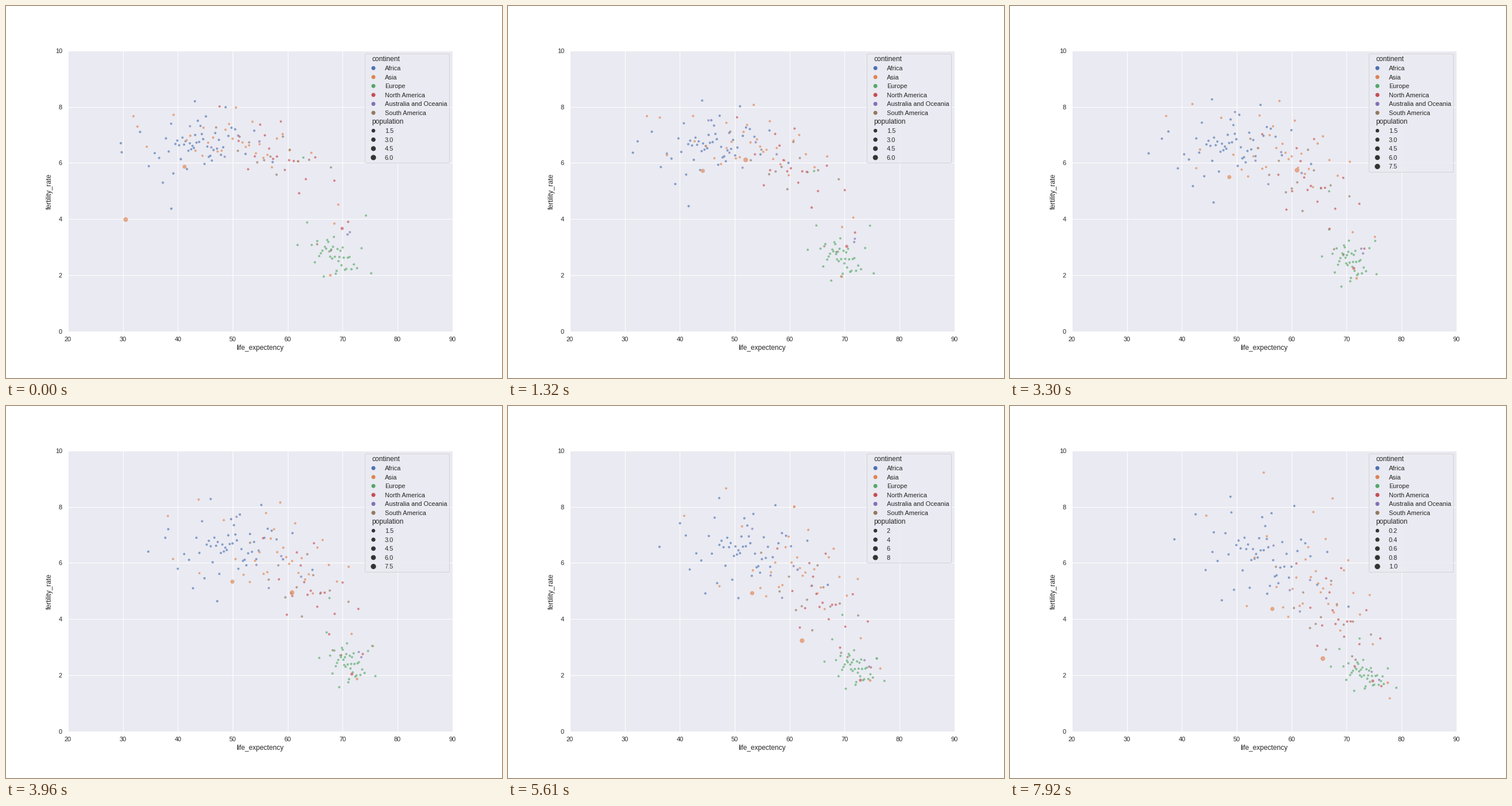
A matplotlib script that plays this animation: 864 px wide and 648 px high, repeating every 8000 ms.

```python
import numpy as np
import matplotlib.pyplot as plt
from matplotlib.animation import FuncAnimation
from matplotlib.patches import FancyBboxPatch, Rectangle

plt.rcParams.update({"font.family": "Liberation Sans", "text.color": "#262626"})

W, H, DPI = 864, 648, 72
LEFT, RIGHT, TOP, BOTTOM = 108, 777.6, 77.76, 567
YEARS, HOLD, TICK, LOOP = 25, 330, 20, 8000
PANEL = "#EAEAF2"
COLORS = {"Africa": "#4C72B0", "Asia": "#DD8452", "Europe": "#55A868",
          "North America": "#C44E52", "Australia and Oceania": "#8172B3",
          "South America": "#937860"}

year = np.arange(YEARS)
rng = np.random.default_rng(11)


def at_years(keys, values):
    return np.interp(year, keys, values)


def cloud(n, *stages):
    """Bell-shaped cloud of n dots; each stage (years 0, 10, 24) gives
    its centre x, y, its spread x, y and its slope."""
    u = (np.arange(n) + 0.5) / n
    bell = 0.55 * np.log(u / (1 - u))
    zx, zy = rng.permutation(bell), rng.permutation(bell)
    cx, cy, sx, sy, slope = (at_years((0, 10, 24), v)[:, None] for v in zip(*stages))
    dx = sx * zx
    return np.stack([cx + dx, cy + slope * dx + sy * zy], axis=2)


def line(x0, y0, x1, y1):
    return track((0, YEARS - 1), (x0, x1), (y0, y1))


def track(keys, xs, ys):
    return np.stack([at_years(keys, xs), at_years(keys, ys)], axis=1)[:, None]


groups = {
    "Africa": [
        cloud(50, (333, 242, 52, 26, 0), (383, 243, 56, 28, 0), (438, 258, 60, 40, 0.3)),
        line(329, 166, 384, 158), line(200, 239, 355, 220), line(288, 353, 448, 327),
    ],
    "Asia": [
        cloud(29, (412, 242, 75, 28, 0.25), (480, 262, 70, 42, 0.3), (537, 318, 56, 58, 0.5)),
        line(222, 192, 342, 191), line(229, 210, 442, 116), line(344, 212, 562, 161),
        line(572, 379, 632, 415),
        # a collapse that leaves the panel and comes back
        track((0, 10, 14, 15, 16, 18, 19, 20, 21, 24),
              (321, 331, 251, 124, 95, 95, 124, 186, 280, 426),
              (226, 250, 283, 288, 291, 292, 290, 289, 283, 264)),
    ],
    "Europe": [
        cloud(38, (572, 434, 27, 18, 0.3), (591, 444, 20, 20, 0.2), (616, 467, 24, 14, 0.25)),
        line(518, 264, 609, 405), line(627, 365, 649, 471),
    ],
    "North America": [
        cloud(17, (472, 258, 52, 32, 0.7), (524, 308, 44, 42, 0.8), (572, 366, 38, 46, 1)),
        line(596, 376, 647, 488),
    ],
    "Australia and Oceania": [
        cloud(5, (381, 236, 50, 22, 0), (450, 262, 48, 40, 0.5), (505, 312, 38, 38, 0.5)),
        line(599, 394, 630, 463), line(595, 398, 643, 477),
    ],
    "South America": [
        cloud(12, (466, 258, 58, 20, 0.25), (505, 300, 50, 32, 0.4), (546, 360, 48, 36, 0.5)),
        line(542, 415, 596, 436), line(566, 426, 602, 442),
    ],
}

# populous countries: path, first and last population in units of 1e8
large = [
    ("Asia", track((0, 1, 3, 4, 7, 8, 10, 14, 20, 24),
                   (208.5, 212, 395, 414, 461, 476, 500, 496.5, 528, 545),
                   (372, 407, 206, 268, 310, 256, 286, 364, 453.5, 440)), 6.6, 10.3),
    ("Asia", track((0, 10, 20, 24), (311, 382, 444, 457), (280, 298, 338, 353.5)), 4.5, 7.6),
    ("Asia", line(565, 469, 658, 482), 0.93, 1.2),
    ("North America", track((0, 7, 14, 24), (585.5, 593.5, 606, 632),
                            (387.5, 442, 477, 479)), 1.87, 2.36),
]

paths, tints, pops = [], [], []
for name, parts in groups.items():
    for part in parts:
        n = part.shape[1]
        paths.append(part)
        tints += [COLORS[name]] * n
        pops.append(np.tile(rng.uniform(0.01, 0.3, n), (YEARS, 1)))
for name, path, first, last in large:
    paths.append(path)
    tints.append(COLORS[name])
    pops.append(np.linspace(first, last, YEARS)[:, None])
paths = np.concatenate(paths, axis=1)
pops = np.concatenate(pops, axis=1)
top_pop = pops.max(axis=1)


def area(pop, step):
    return 18 + 54 * pop / top_pop[step]


fig = plt.figure(figsize=(W / DPI, H / DPI), dpi=DPI, facecolor="white")
ax = fig.add_axes((0, 0, 1, 1))
ax.set_xlim(0, W)
ax.set_ylim(H, 0)
ax.axis("off")

panel = Rectangle((LEFT, TOP), RIGHT - LEFT, BOTTOM - TOP, fc=PANEL, lw=0, zorder=0)
ax.add_patch(panel)
for i, gx in enumerate(np.linspace(LEFT, RIGHT, 8)):
    ax.plot([gx, gx], [TOP, BOTTOM], color="white", lw=1, zorder=1)
    ax.text(gx, 584, str(20 + 10 * i), size=11, ha="center")
for i, gy in enumerate(np.linspace(BOTTOM, TOP, 6)):
    ax.plot([LEFT, RIGHT], [gy, gy], color="white", lw=1, zorder=1)
    ax.text(98, gy, str(2 * i), size=11, ha="right", va="center_baseline")
ax.text(442.8, 599, "life_expectency", size=12, ha="center")
ax.text(81.8, (TOP + BOTTOM) / 2, "fertility_rate", size=12, rotation=90,
        rotation_mode="anchor", ha="center", va="bottom")

dots = ax.scatter(*paths[0].T, s=area(pops[0], 0), c=tints, alpha=0.65,
                  edgecolors="white", linewidths=0.34, zorder=2)
dots.set_clip_path(panel)

# legend
ROW, MARK_X = 15.58, 640
BOX_H = 190
box = FancyBboxPatch((624.5, 83.3), 147.6, BOX_H, boxstyle="round,pad=0,rounding_size=2.2",
                     fc=PANEL, ec="#CCCCCC", lw=1, alpha=0.8, snap=True, zorder=3)
ax.add_patch(box)


def row_text(x, row, label, size=11):
    return ax.text(x, 96.4 + ROW * row, label, size=size, zorder=4)


def row_marks(first, n):
    return np.column_stack([np.full(n, MARK_X), 92.6 + ROW * np.arange(first, first + n)])


def legend_dots(first, n, colors):
    return ax.scatter(*row_marks(first, n).T, s=36, c=colors, edgecolors="face",
                      linewidths=1, zorder=4)


row_text(637.7, 0, "continent", 12)
row_text(637.7, 7, "population", 12)
for i, name in enumerate(COLORS, 1):
    row_text(659.7, i, name)
legend_dots(1, 6, list(COLORS.values()))
marks = legend_dots(8, 5, ["#333333"] * 5)
labels = [row_text(659.7, i, "") for i in range(8, 13)]


def levels(step):
    """Legend labels and the population one unit stands for."""
    if step < 15:
        return ["1.5", "3.0", "4.5", "6.0", "7.5"][:4 if step < 8 else 5], 1
    if step < 22:
        return ["2", "4", "6", "8"], 1
    return ["0.2", "0.4", "0.6", "0.8", "1.0"], 10


def draw(i):
    step = (i * TICK + TICK // 2) // HOLD
    dots.set_offsets(paths[step])
    dots.set_sizes(area(pops[step], step))
    names, unit = levels(step)
    n = len(names)
    box.set_height(BOX_H + ROW * (n - 4))
    for label, name in zip(labels, names + [""]):
        label.set_text(name)
    marks.set_offsets(row_marks(8, n))
    marks.set_sizes(area(unit * np.array(names, float), step))
    return dots, marks, box, *labels


anim = FuncAnimation(fig, draw, frames=LOOP // TICK, interval=TICK,
                     repeat=True, repeat_delay=0, cache_frame_data=False)
plt.show()
```
